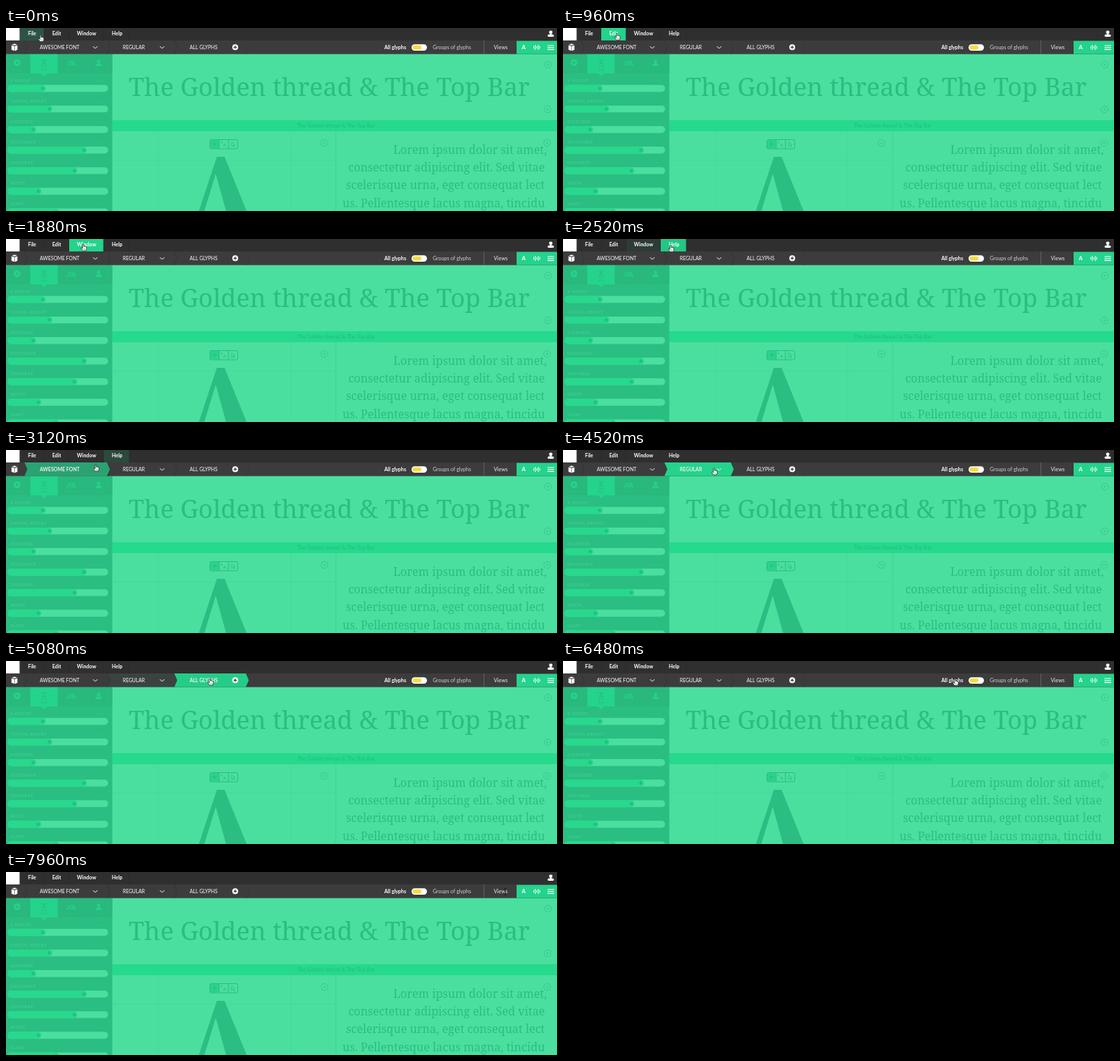
An HTML page with a canvas for the animation above (8 s loop, 750x250 px).

```html
<!DOCTYPE html>
<html lang="en">
<head>
<meta charset="utf-8">
<title>Top bar hover tour</title>
<style>
html, body { margin: 0; width: 100%; height: 100%; overflow: hidden; background: #4adf9f; }
canvas { display: block; width: 750px; height: 250px; }
</style>
</head>
<body>
<canvas id="stage"></canvas>
<script>
const LOOP = 8000, FADE = 400;
const SANS = 'Lato, "Open Sans", sans-serif', SERIF = '"Noto Serif", serif';
const GREEN = '#24d38c', INK = '#2bbd82', SHADE = '#36cb8e';
const canvas = document.getElementById('stage');
const ctx = canvas.getContext('2d');
const ratio = window.devicePixelRatio || 1;
canvas.width = 750 * ratio;
canvas.height = 250 * ratio;
ctx.scale(ratio, ratio);

// Hover spans: label, left, right, label x, start, end
const menus = [
  ['File', 19, 52, 30, -90, 440],
  ['Edit', 52, 86, 63, 500, 1250],
  ['Window', 86, 133, 96.5, 1250, 2150],
  ['Help', 133, 168, 144, 2150, 2780]
];
const tabs = [
  ['AWESOME FONT', 25, 138, 46, 2850, 3960],
  ['REGULAR', 138, 229, 159, 3960, 4700],
  ['ALL GLYPHS', 229, 327, 250, 4700, 5260]
];
// Pointer path: time, x, y
const path = [
  [0, 47, 9.5], [500, 53, 8], [1250, 86, 7], [1880, 105, 7], [2150, 133, 7],
  [2500, 147, 8], [2780, 139, 15], [3120, 122, 20], [3500, 113, 24],
  [3920, 137.5, 23], [4320, 178, 25], [4700, 230, 25], [5080, 277.5, 24],
  [5320, 318, 17], [5600, 400, 6], [5920, 492, 7], [6240, 525, 21],
  [6480, 533.5, 24.5], [6740, 553, 25], [7100, 605, 26], [7400, 660, 26],
  [7600, 679, 27], [8000, 679.5, 27]
];
const sliders = [
  ['X HEIGHT', 50], ['CAPITAL HEIGHT', 59], ['ASCENDER', 37], ['DESCENDER', 106],
  ['CROSSBAR', 93], ['WIDTH', 44], ['SLANT', 68]
];

const clamp = v => Math.max(0, Math.min(1, v));
const hoverLevel = (t, on, off) => Math.min(clamp((t - on) / FADE), 1 - clamp((t - off) / FADE));

function rect(x, y, w, h, color) {
  ctx.fillStyle = color;
  ctx.fillRect(x, y, w, h);
}
function pill(x, y, w, h, color, radius = h / 2) {
  ctx.beginPath();
  ctx.roundRect(x, y, w, h, radius);
  ctx.fillStyle = color;
  ctx.fill();
}
function disc(x, y, r, color) {
  ctx.beginPath();
  ctx.arc(x, y, r, 0, Math.PI * 2);
  ctx.fillStyle = color;
  ctx.fill();
}
function text(str, x, y, size, color, { font = SANS, weight = 400, align = 'left', spacing = 0 } = {}) {
  ctx.font = `${weight} ${size}px ${font}`;
  ctx.textAlign = align;
  ctx.letterSpacing = spacing + 'px';
  ctx.fillStyle = color;
  ctx.fillText(str, x, y);
}
function shape(d, fill, stroke, width = 1) {
  const p = new Path2D(d);
  if (fill) { ctx.fillStyle = fill; ctx.fill(p); }
  if (stroke) { ctx.strokeStyle = stroke; ctx.lineWidth = width; ctx.stroke(p); }
}
function person(x, y, s, color) {
  disc(x, y - 2.2 * s, 2.3 * s, color);
  pill(x - 4.2 * s, y + 0.7 * s, 8.4 * s, 3.3 * s, color, 1.5 * s);
  rect(x - s, y - s, 2 * s, 2.5 * s, color);
}

function drawSidebar() {
  const panel = '#2bbe82', tabShade = '#29b87d', icon = '#26d089';
  rect(0, 35.5, 144.5, 214.5, panel);
  rect(0, 35.5, 144.5, 26.5, tabShade);
  rect(33, 35.5, 37.5, 26.5, GREEN);
  shape('M47.5 62h9l-4.5 4z', GREEN);
  disc(15, 47.5, 4.8, icon);
  disc(15, 47.5, 1.6, tabShade);
  text('A', 52, 51, 9, INK, { weight: 700, align: 'center' });
  shape('M47.5 43.5h9M47.5 52.5h9', null, INK, 0.7);
  text('A', 86, 51.5, 10, icon, { weight: 700, align: 'center' });
  shape('M89 44.5l2.8 7M92 44.5l2.8 7', null, icon, 1.8);
  person(126, 48, 1.05, icon);
  ['Settings', 'Style', 'Glyphs', 'Share'].forEach((label, i) =>
    text(label, 15 + 37 * i, 58, 4, i === 1 ? INK : '#29c483', { align: 'center' }));

  sliders.forEach(([label, knob], i) => {
    const y = 82.5 + 28.1 * i;
    text(label, 6, y - 8.9, 4.8, '#3fd093', { weight: 700, spacing: 0.8 });
    text('500', 121, y - 8.9, 4.6, '#30c78a', { spacing: 0.8 });
    pill(2, y - 4.7, 137, 9.4, '#4adf9f');
    pill(2, y - 4.7, knob + 2, 9.4, '#27d88d');
    disc(knob, y, 2.5, '#24c580');
    disc(knob, y, 1, '#22b877');
  });
}

function roundButton(x, y) {
  ctx.beginPath();
  ctx.arc(x, y, 4.6, 0, Math.PI * 2);
  ctx.strokeStyle = SHADE;
  ctx.lineWidth = 1;
  ctx.stroke();
  disc(x, y, 1.2, SHADE);
}

function drawPanels() {
  rect(144.5, 35.5, 605.5, 214.5, '#4adf9f');
  text('The Golden thread & The Top Bar', 167, 93.3, 34.4, INK, { font: SERIF });

  rect(144.5, 126, 605.5, 15, '#25d98d');
  text('The Golden thread & The Top Bar', 449, 136, 7.2, '#25bb7d', { align: 'center' });

  shape('M207.5 141V250M387.5 141V250M144.5 180.5H449', null, '#43d898', 0.8);
  shape('M449 141V250', null, '#3fd394', 1);
  shape('M287 176H297.5L327.5 250H299.5L285.5 199L270 250H262.5Z', INK);

  pill(277.5, 152.5, 38, 12.5, '#4adf9f', 2);
  rect(278, 153, 12, 11.5, '#2ad38b');
  shape('M279.5 152.5h34a2 2 0 0 1 2 2v8.5a2 2 0 0 1-2 2h-34a2 2 0 0 1-2-2v-8.5a2 2 0 0 1 2-2zM290.2 152.5v12.5M302.8 152.5v12.5', null, INK, 1);
  shape('M283.8 155.5v6M280.8 158.5h6', null, INK, 0.9);
  text('A', 297.5, 162, 6, INK, { weight: 700, align: 'center' });
  disc(293.5, 156.5, 1, INK);
  shape('M307 155.5l5 4-2.2.3 1 2.2-1 .4-1-2.1-1.8 1.4z', null, INK, 0.7);

  [[737.5, 50], [737, 111], [433.5, 157], [736.5, 157]].forEach(p => roundButton(...p));

  ['Lorem ipsum dolor sit amet,',
   'consectetur adipiscing elit. Sed vitae',
   'scelerisque urna, eget consequat lect',
   'us. Pellentesque lacus magna, tincidu'
  ].forEach((line, i) =>
    text(line, i ? 733.5 : 736, 171.5 + 24.4 * i, 15.5, INK, { font: SERIF, align: 'right' }));
}

function tabOutline(left, right) {
  return `M${left} 17H${right}L${right + 4} 26.3L${right} 35.5H${left}L${left + 4} 26.3Z`;
}

function drawBars(t) {
  rect(0, 0, 750, 17, '#2f2f2f');
  rect(0, 17, 750, 18.5, '#3c3c3c');
  rect(0, 0, 18.5, 17, '#fff');

  for (const [label, left, right, x, on, off] of menus) {
    ctx.globalAlpha = hoverLevel(t, on, off);
    rect(left, 0, right - left, 17, GREEN);
    ctx.globalAlpha = 1;
    rect(right - 0.5, 0, 0.6, 17, '#292929');
    text(label, x, 10.3, 6.9, '#fff', { weight: 700 });
  }
  person(741.5, 8, 1, '#fff');

  shape('M7.5 23.5l4 1.3v6.5l-4-1.5zM15.5 23.5l-3.4 1.3v6.5l3.4-1.5zM8 22.5l3.7-1 3.4 1-3.5 1.2z', '#fff');
  for (const [label, left, right, x, on, off] of tabs) {
    const level = hoverLevel(t, on, off);
    shape(`M${left} 17l4 9.3-4 9.2`, null, '#343434', 1);
    ctx.globalAlpha = level;
    shape(tabOutline(left, right), GREEN);
    ctx.globalAlpha = 1;
    text(label, x, 28.8, 6.7, '#eee', { weight: level > 0.5 ? 700 : 500 });
  }
  shape('M327 17l4 9.3-4 9.2', null, '#383838', 1);
  shape('M118.5 25l3 3 3-3M209.5 25l3 3 3-3', null, '#f4f4f4', 1);
  disc(312, 26.3, 4, '#fff');
  shape('M309.8 26.3h4.4M312 24.1v4.4', null, '#3c3c3c', 1.2);

  text('All glyphs', 515, 28.8, 6.9, '#fff', { weight: 700 });
  pill(552, 22.3, 21, 8.6, '#fff');
  pill(553.5, 23.8, 12, 5.6, '#f5dc42');
  text('Groups of glyphs', 581, 28.8, 7, '#d0d0d0');
  rect(650, 17, 1, 18.5, '#606060');
  text('Views', 664, 28.8, 7.1, '#eee');

  rect(695, 17.6, 55, 17.9, GREEN);
  text('A', 704.5, 29, 7.5, '#fff', { weight: 700, align: 'center' });
  shape('M718.5 24.5v4M720.5 23v7M722.5 24.8v3.4M724.5 23v7M726.5 24.5v4', null, '#fff', 0.9);
  shape('M737 24h9M737 26.7h9M737 29.4h9', null, '#fff', 1.1);
}

function pointerAt(t) {
  const i = Math.max(1, path.findIndex(p => p[0] >= t));
  const [t0, x0, y0] = path[i - 1], [t1, x1, y1] = path[i];
  const k = (t - t0) / (t1 - t0);
  return [x0 + (x1 - x0) * k, y0 + (y1 - y0) * k];
}

function drawPointer(t) {
  const [x, y] = pointerAt(t);
  ctx.save();
  ctx.translate(x, y);
  if (x > 640) {
    shape('M-1.5 -4.5h3M0 -4.5v9M-1.5 4.5h3', null, '#222', 0.9);
  } else {
    shape('M-.8 .2Q0-.6 .8 .2V3.2L2 3 3.2 3.4 4.5 4V6.4L3.8 9H-.6L-3 5.8Q-3 4.6-1.9 5L-.8 6Z', '#fff', '#1c1c1c', 0.7);
    shape('M1 6v1.8M2.4 6v1.8', null, '#333', 0.4);
  }
  ctx.restore();
}

function frame() {
  const t = performance.now() % LOOP;
  drawPanels();
  drawSidebar();
  drawBars(t);
  drawPointer(t);
  requestAnimationFrame(frame);
}
frame();
</script>
</body>
</html>
```
